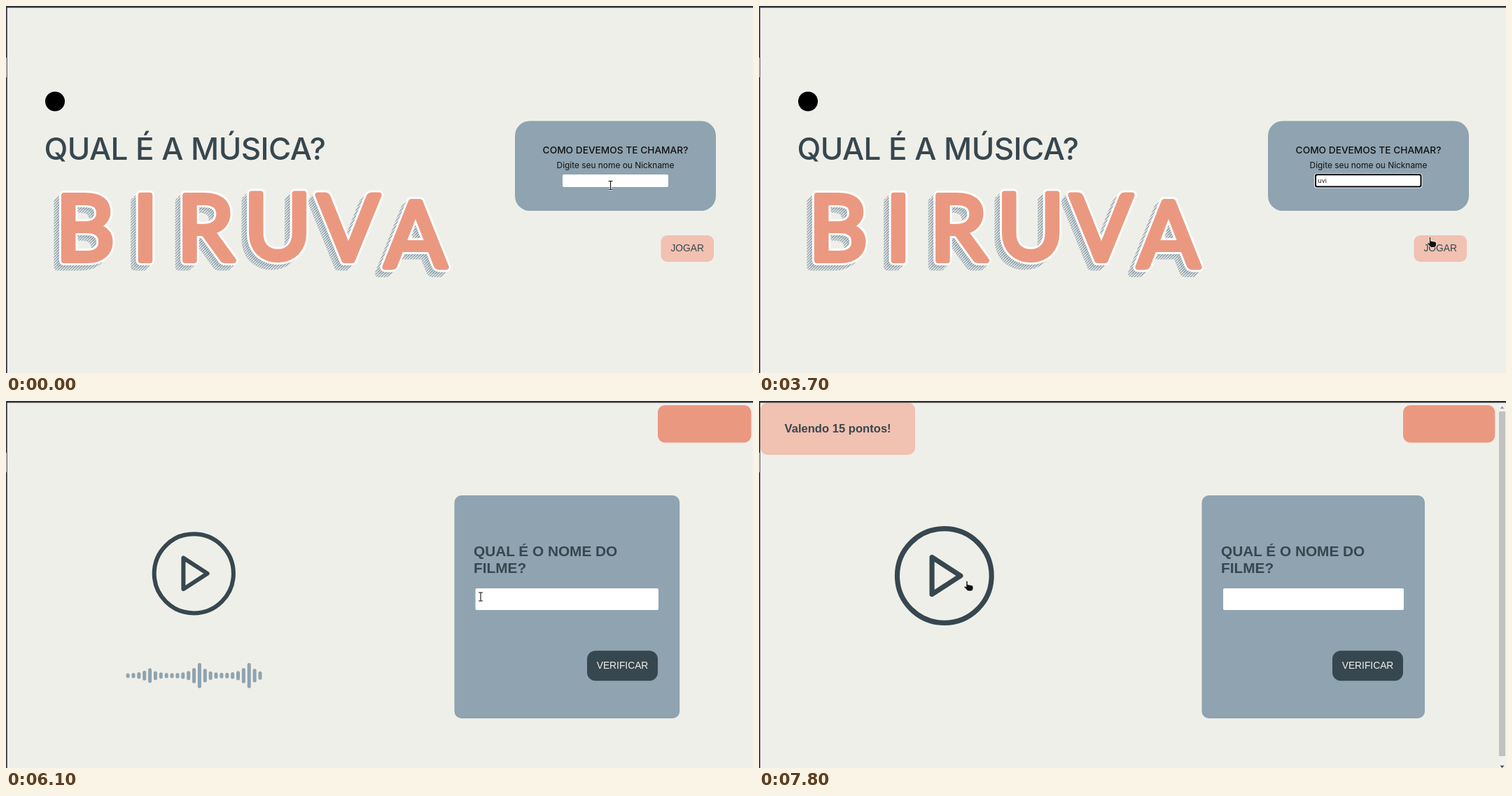
An HTML page that plays this animation: 1067 px wide and 525 px high, repeating every 8000 ms.

```html
<!DOCTYPE html>
<html lang="pt-BR">
<head>
<meta charset="utf-8">
<title>Qual é a música?</title>
<style>
  html, body { margin: 0; width: 100%; height: 100%; overflow: hidden; background: #efefe9; }
  svg { display: block; width: 100%; height: 100%; }
  text { font-family: "Liberation Sans", Arial, sans-serif; fill: #37474f; }
  .geo { font-family: Inter, sans-serif; }
  .mid { text-anchor: middle; }
  .label { font-size: 13.8px; }
  .dark { fill: #37474f; }
  .blue { fill: #8fa3b0; }
  .orange { fill: #eb9880; }
  .pink { fill: #f1c1b2; }
  .light { fill: #efefe9; }
  .line { fill: none; stroke: #37474f; stroke-width: 6; stroke-linejoin: round; }
  .title text { font: 400 130px Lato, sans-serif; stroke-linejoin: round; text-anchor: middle; }
  .pointer { fill: #111; stroke: #fff; stroke-width: .9; stroke-linejoin: round; }
</style>
</head>
<body>
<svg viewBox="0 0 1067 525">
  <defs>
    <pattern id="hatch" width="4" height="4" patternUnits="userSpaceOnUse">
      <path d="M-1 1L1-1M-1 5L5-1M3 5L5 3" stroke="#8fa3b0" stroke-width="1.4"/>
    </pattern>
  </defs>
  <rect class="light" width="1067" height="525"/>

  <g id="welcome">
    <circle cx="70" cy="136.5" r="14"/>
    <text class="geo" x="54.5" y="219.5" font-size="44" font-weight="500" letter-spacing="-.55">QUAL É A MÚSICA?</text>
    <g class="title" id="title"></g>

    <rect class="blue" x="727" y="164.5" width="287" height="128.5" rx="21"/>
    <text class="geo mid" x="870.5" y="211" font-size="13.7" font-weight="500" style="fill:#111">COMO DEVEMOS TE CHAMAR?</text>
    <text class="geo mid" x="870.5" y="232" font-size="11.9" style="fill:#111">Digite seu nome ou Nickname</text>
    <rect x="795" y="241" width="151" height="18" rx="2" fill="#fff"/>
    <g id="focus">
      <rect x="793" y="239.5" width="154.5" height="21" rx="4" fill="#fff"/>
      <rect x="794" y="240.3" width="152.5" height="19.2" rx="3"/>
      <rect x="796" y="242.3" width="148.5" height="15.2" rx="1.5" fill="#fff"/>
      <text class="geo" id="typed" x="798.5" y="253.3" font-size="8.8" style="fill:#111"></text>
      <rect id="caret" y="245" width="1" height="10"/>
    </g>

    <rect class="pink" x="935.5" y="328" width="75.5" height="38" rx="9"/>
    <text class="label mid" x="973.2" y="351">JOGAR</text>
    <g id="hover">
      <rect class="dark" x="935.5" y="328" width="75.5" height="38" rx="9"/>
      <text class="label mid" x="973.2" y="351" style="fill:#efefe9">JOGAR</text>
    </g>
  </g>

  <g id="game">
    <g id="play">
      <circle class="line" r="56.6"/>
      <path class="line" d="M-14.9-22.3V22.3L19.4 0Z"/>
    </g>
    <g id="wave" class="blue"></g>
    <rect id="score" class="orange" y="6" height="53.5" rx="10"/>
    <rect id="card" class="blue" y="135" height="319" rx="10"/>
    <g id="question" font-size="20.8" font-weight="700">
      <text y="221.5">QUAL É O NOME DO</text>
      <text y="246">FILME?</text>
    </g>
    <rect id="answer" y="268" height="31" rx="2" fill="#fff"/>
    <g id="check">
      <rect class="dark" y="357.3" width="101" height="43" rx="12"/>
      <text class="label mid" x="50.5" y="383.3" style="fill:#efefe9">VERIFICAR</text>
    </g>
    <g id="prize">
      <rect class="pink" x="2" y="2.5" width="221" height="74.5" rx="10"/>
      <text x="36.5" y="45" font-size="16.6" font-weight="700">Valendo 15 pontos!</text>
    </g>
    <g id="scrollbar">
      <rect x="1057" y="3" width="10" height="522" fill="#f1f1f1"/>
      <rect x="1057" y="15" width="9" height="493" fill="#c1c1c1"/>
      <path d="M1058.5 11l3-3.5 3 3.5z" fill="#999"/>
      <path d="M1058.5 521.5l3 3.5 3-3.5z" fill="#444"/>
    </g>
  </g>

  <path d="M0 0H1067V2.5H1.7V525H0Z" fill="#2f303e"/>
  <rect y="74" width="1" height="28" fill="#c4c4c4"/>

  <g id="cursor">
    <g id="beam" fill="none">
      <path d="M-3-6H3M0-6V6M-3 6H3" stroke="#fff" stroke-width="2.4"/>
      <path d="M-3-6H3M0-6V6M-3 6H3" stroke="#111" stroke-width="1.1"/>
    </g>
    <path id="arrow" class="pointer" d="M0 0V13L3 10.2 5 15 7.2 14 5.1 9.5H9.4Z"/>
    <path id="hand" class="pointer" d="M-1.2 1Q0-1.2 1.2 1V5.5L7 6.5Q9 7 9 9V11.5Q8.5 15 5.5 15H2Q0 14.5-1 12.5L-4 9.5Q-4.5 7.5-2.8 7.8L-1.2 9Z"/>
  </g>
</svg>

<script>
const LOOP = 8000;
const BARS = 25;
const $ = id => document.getElementById(id);
const clamp = v => Math.max(0, Math.min(1, v));
const show = (id, on) => $(id).style.display = on ? '' : 'none';
const move = (id, x, y, scale = 1) =>
  $(id).setAttribute('transform', `translate(${x} ${y}) scale(${scale})`);
const span = (id, x, width) => {
  $(id).setAttribute('x', x);
  $(id).setAttribute('width', width);
};

// Title lettering: hatched extrusion, white rim, coloured face
const layers = [
  [-9, 9, 'url(#hatch)', 11], [-5, 5, 'url(#hatch)', 11],
  [0, 0, '#fff', 14], [0, 0, '#eb9880', 8]
];
$('title').innerHTML = layers.map(([dx, dy, paint, width]) =>
  `<text transform="translate(${dx} ${dy})" x="113 199 285 388 489 585" y="364 364 364 362 364 374"
    style="fill:${paint};stroke:${paint};stroke-width:${width}">BIRUVA</text>`).join('');

$('wave').innerHTML = '<rect width="5" rx="2.5"/>'.repeat(BARS);
const bars = [...$('wave').children];

// The screen refreshes unevenly, so time is held between refreshes
const refreshes = [0, 600, 700, 1600, 1800, 2000, 2300,
  3200, 3300, 3400, 3500, 3600, 3700, 3800, 3900, 4000, 4300, 4700, 4800,
  5100, 5300, 5500, 5700, 5900, 6100, 6400, 6600, 6800, 7000, 7200, 7400, 7600, 7800];

const route = [[0, 863.5, 256.5], [3100, 863.5, 256.5], [3700, 958.5, 330.5], [4000, 975, 346],
  [5500, 975, 346], [5700, 916, 335], [5900, 678, 280], [6100, 678, 280],
  [6400, 456, 262], [6600, 456, 262], [6800, 345, 254], [7000, 321, 255],
  [7200, 297, 257], [LOOP, 297, 257]];

function cursorAt(t) {
  const next = Math.max(1, route.findIndex(p => p[0] >= t));
  const [t0, x0, y0] = route[next - 1], [t1, x1, y1] = route[next];
  const k = (t - t0) / (t1 - t0);
  return [x0 + (x1 - x0) * k, y0 + (y1 - y0) * k];
}

function drawCursor(t, playing) {
  const [x, y] = cursorAt(t);
  const overField = playing ? x > 670 && x < 932 && y < 299 : x < 946 && y < 260;
  const overButton = t < 4800 && x > 935 && y > 328;
  const overPlay = Math.hypot(x - 268, y - 247) < 60;
  const shape = overField ? 'beam' : overButton || overPlay ? 'hand' : 'arrow';
  for (const id of ['beam', 'arrow', 'hand']) show(id, id === shape);
  move('cursor', x, y);
}

function drawWelcome(t) {
  show('focus', t >= 600 && t < 4700);
  const count = [1800, 2000, 2300].filter(key => t >= key).length;
  $('typed').textContent = 'uvi'.slice(0, count);
  $('caret').setAttribute('x', 798.5 + (count ? $('typed').getComputedTextLength() : 0));
  show('caret', [[700, 1600], [1800, 3200], [3800, 4300]].some(([a, b]) => t >= a && t < b));
  $('hover').style.opacity = clamp((t - 3700) / 300);
}

function drawWave(t, narrow) {
  const peaks = [[3, 1], [12, 1], [19, .5]];
  const drift = (7000 - t) * .011;
  const swell = 20 + 13 * Math.sin(Math.PI * (t - 5500) / 1500);
  const fade = clamp((7700 - t) / 500);
  bars.forEach((bar, i) => {
    const pulse = peaks.reduce((sum, [at, size]) =>
      sum + size * Math.exp(-.8 * Math.abs(i - (at + drift) % BARS)), 0);
    const grow = clamp((t - 5100 - 28 * i) / 150);
    const shrink = clamp((7030 + 33 * i - t) / 110);
    const height = (6 + swell * pulse) * grow * shrink * fade;
    bar.setAttribute('x', 171.6 + 7.87 * i - (narrow ? 3.7 : 0));
    bar.setAttribute('y', (narrow ? 409.5 : 392.8) - height / 2);
    bar.setAttribute('height', height);
  });
}

function drawGame(t) {
  const narrow = t >= 7200;
  const pick = (wide, slim) => narrow ? slim : wide;
  move('play', pick(268.3, 264.8), pick(246.8, 250), pick(1, 1.19));
  span('score', pick(931, 920), pick(133.5, 131.3));
  span('card', pick(640.5, 632.5), pick(321.7, 318.5));
  span('answer', pick(670.5, 663), pick(261.5, 258));
  move('question', pick(668, 660), 0);
  move('check', pick(830, 819), 0);
  show('scrollbar', narrow);
  show('prize', t >= 7600);
  drawWave(t, narrow);
}

function draw(now) {
  const t = refreshes.findLast(time => time <= now % LOOP);
  const playing = t >= 5100;
  show('welcome', !playing);
  show('game', playing);
  (playing ? drawGame : drawWelcome)(t);
  drawCursor(t, playing);
}

const start = performance.now();
function tick() {
  draw(performance.now() - start);
  requestAnimationFrame(tick);
}
tick();
</script>
</body>
</html>
```
